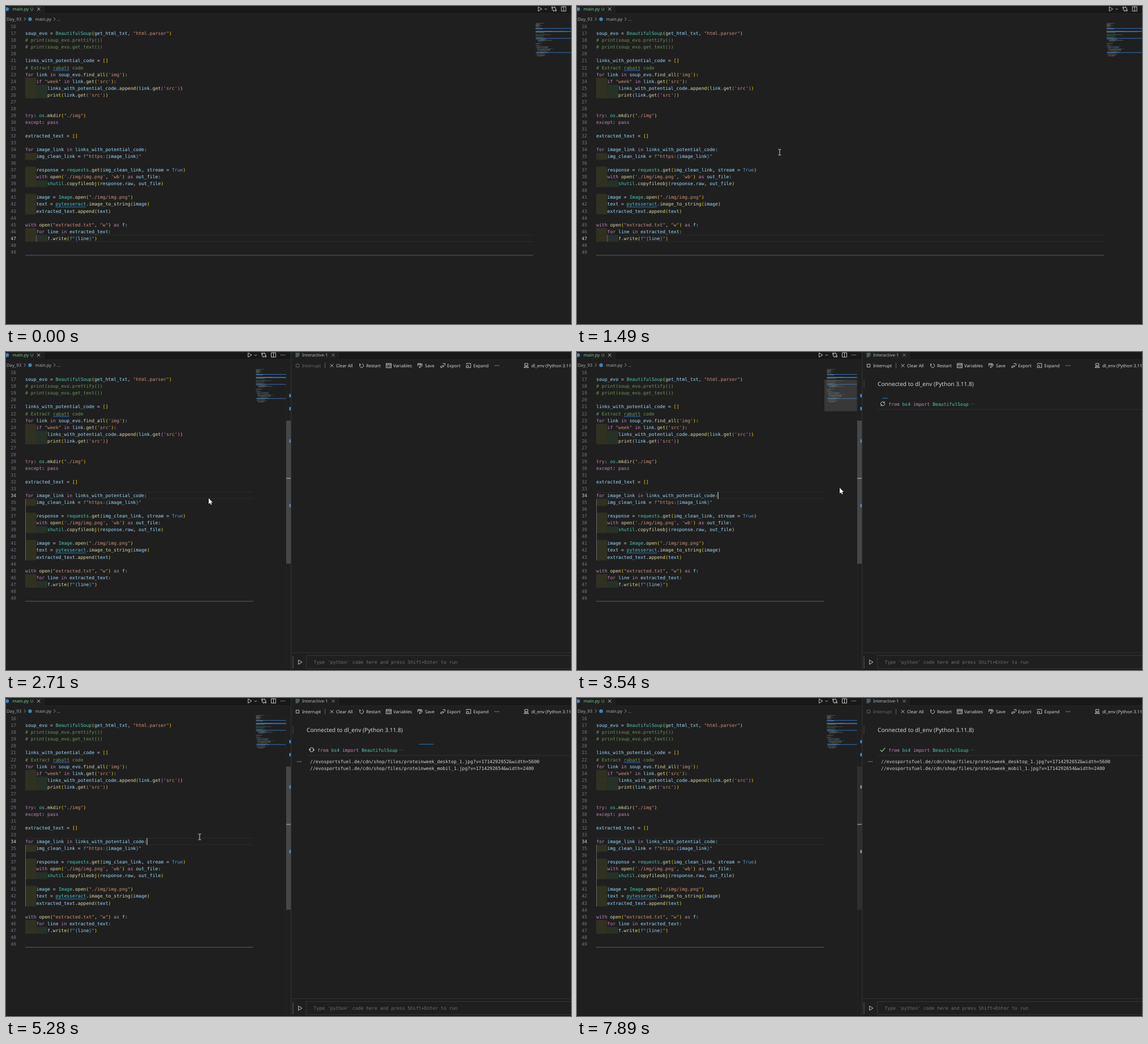
Recreate the animation shown at these times as an HTML page with a canvas. Size 998x561 px, loop 8000 ms.

```html
<!DOCTYPE html>
<html lang="en">
<head>
<meta charset="utf-8">
<title>Editor session</title>
<style>
html, body { margin: 0; width: 100%; height: 100%; overflow: hidden; background: #1f1f1f; }
canvas { display: block; width: 998px; height: 561px; }
</style>
</head>
<body>
<canvas id="stage" width="998" height="561"></canvas>
<script>
const ctx = document.getElementById('stage').getContext('2d');
const W = 998, H = 561, LOOP = 8000;
const CW = 4.886, LH = 12.047, LEFT = 34, FIRST = 16, TOP = 30.35;
const MONO = '8.116px "DejaVu Sans Mono", "Noto Sans Mono", monospace';
const ui = size => size + 'px "Noto Sans", "Open Sans", sans-serif';
const C = {
  bg: '#1f1f1f', bar: '#181818', edge: '#2b2b2b', text: '#d4d4d4', dim: '#6e7681',
  key: '#c586c0', name: '#9cdcfe', type: '#4ec9b0', fn: '#dcdcaa', str: '#ce9178',
  note: '#6a9955', lit: '#569cd6', op: '#d4d4d4', info: '#3794ff'
};
const BRACKETS = ['#ffd700', '#da70d6', '#179fff'];

const SOURCE = `
soup_evo = BeautifulSoup(get_html_txt, "html.parser")
# print(soup_evo.prettify())
# print(soup_evo.get_text())

links_with_potential_code = []
# Extract rabatt code
for link in soup_evo.find_all('img'):
    if "week" in link.get('src'):
        links_with_potential_code.append(link.get('src'))
        print(link.get('src'))


try: os.mkdir("./img")
except: pass

extracted_text = []

for image_link in links_with_potential_code:
    img_clean_link = f"https:{image_link}"

    response = requests.get(img_clean_link, stream = True)
    with open('./img/img.png', 'wb') as out_file:
        shutil.copyfileobj(response.raw, out_file)

    image = Image.open("./img/img.png")
    text = pytesseract.image_to_string(image)
    extracted_text.append(text)

with open("extracted.txt", "w") as f:
    for line in extracted_text:
        f.write(f"{line}")

`.split('\n');

const KEYS = new Set('for in if with as try except pass from import'.split(' '));
const TYPES = new Set('BeautifulSoup os requests shutil Image pytesseract bs4'.split(' '));

function tokenize(line) {
  const out = [];
  let depth = 0;
  const add = (col, text, color) => out.push({ col, text, color });
  for (const m of line.matchAll(/#.*|f"[^"]*"|"[^"]*"|'[^']*'|\w+|[^\w\s]/g)) {
    const s = m[0], at = m.index;
    if (s[0] === '#') add(at, s, C.note);
    else if (s.startsWith('f"')) {
      add(at, 'f', C.lit);
      for (const p of s.slice(1).matchAll(/[{}]|[^{}]+/g)) {
        const inner = s[p.index] === '{';
        add(at + 1 + p.index, p[0], /[{}]/.test(p[0]) ? C.lit : inner ? C.name : C.str);
      }
    }
    else if (/["']/.test(s[0])) add(at, s, C.str);
    else if (/[(\[]/.test(s)) add(at, s, BRACKETS[depth++ % 3]);
    else if (/[)\]]/.test(s)) add(at, s, BRACKETS[--depth % 3]);
    else if (KEYS.has(s)) add(at, s, C.key);
    else if (TYPES.has(s)) add(at, s, C.type);
    else if (s === 'True') add(at, s, C.lit);
    else if (/\w/.test(s)) add(at, s, line[at + s.length] === '(' ? C.fn : C.name);
    else add(at, s, C.op);
  }
  return out;
}

const LINES = SOURCE.map((text, i) => ({
  no: FIRST + i,
  depth: text.search(/\S/) / 4,
  tokens: tokenize(text)
}));
const CELL = tokenize('from bs4 import BeautifulSoup');
const HEAD = [29, 15, 13, 22, 9, 15, 0, 24, 24, 0, 0, 56, 104, 30, 0];
const NOTED = [8, 12, 22, 42];

const lineTop = no => TOP + (no - FIRST) * LH;

function box(x, y, w, h, color) {
  ctx.fillStyle = color;
  ctx.fillRect(x, y, w, h);
}

function label(text, x, y, color, font, align = 'left') {
  ctx.font = font;
  ctx.fillStyle = color;
  ctx.textAlign = align;
  ctx.fillText(text, x, y);
}

function tokensAt(tokens, x, y) {
  for (const t of tokens) label(t.text, x + t.col * CW, y, t.color, MONO);
}

function icon(path, x, y, color = C.text, width = 0.9, turn = 0) {
  ctx.save();
  ctx.translate(x, y);
  ctx.rotate(turn);
  ctx.strokeStyle = color;
  ctx.lineWidth = width;
  ctx.stroke(new Path2D(path));
  ctx.restore();
}

function disc(x, y, r, color) {
  ctx.fillStyle = color;
  ctx.beginPath();
  ctx.arc(x, y, r, 0, 7);
  ctx.fill();
}

function dots(x, y, color = C.text) {
  for (const d of [-3, 0, 3]) disc(x + d, y, 0.7, color);
}

const ICON = {
  play: 'M-2.8-3.8L3.4 0L-2.8 3.8Z',
  down: 'M-2-1L0 1L2-1',
  next: 'M-1.3-3L1.5 0L-1.3 3',
  cross: 'M-2.7-2.7L2.7 2.7M2.7-2.7L-2.7 2.7',
  compare: 'M-3-1V2Q-3 3 0 3M-1 1.5L.5 3L-1 4.5M3 1V-2Q3-3 0-3M1-4.5L-.5-3L1-1.5M-4-3.5h2v2h-2zM2 1.5h2v2h-2z',
  split: 'M-4-3.8H4V3.8H-4ZM0-3.8V3.8',
  stop: 'M-2.6-2.6H2.6V2.6H-2.6Z',
  redo: 'M-2.5-2.2A3.4 3.4 0 1 0 1-3.3M-3.2-3.8V-1.6H-1',
  table: 'M-4.5-3.8H4.5V3.8H-4.5ZM-4.5-1.8H4.5M-2.5 0H-.5M-2.5 2H-.5M1 0H3M1 2H3',
  save: 'M-3.6 1V-3.6H3L4-2.6V-1M-1.8-3.6V-1.5H1.5V-3.6M-1 3.5L0 1L3-1.5L4.4 0L1.5 2.7Z',
  send: 'M-3.5 3.5V1H2M0-1L2 1L0 3M0-3.6H4V0M-3.5 3.5H-1',
  expand: 'M-3.8-2V-3.8H3.8V3.5H1M-3.8 0H0V3.6H-3.8Z',
  kernel: 'M-2.8-3.8H2.8V0H-2.8ZM-4 3.5L-2.6 1.4H2.6L4 3.5Z',
  sync: 'M-3.3 1A3.4 3.4 0 0 1 2.6-2.2M3.3-1A3.4 3.4 0 0 1-2.6 2.2M3-4V-1.8H.8M-3 4V1.8H-.8',
  check: 'M-4.2 .4L-1.4 3L4.2-3.4',
  page: 'M-3.5-3H3.5M-3.5-1H3.5M-3.5 1H3.5M-3.5 3H1',
  beam: 'M-2.5-5H-.7L0-4.5L.7-5H2.5M0-4.5V4.5M-2.5 5H-.7L0 4.5L.7 5H2.5'
};

function squiggle(col, len, no) {
  const y = lineTop(no) + 11;
  ctx.strokeStyle = C.info;
  ctx.lineWidth = 0.8;
  ctx.beginPath();
  for (let x = 0; x <= len * CW; x += 0.5) {
    ctx.lineTo(LEFT + col * CW + x, y + 0.7 * Math.sin(x * 2));
  }
  ctx.stroke();
}

function minimap(x, right, slider) {
  const row = no => 30.3 + (no - 1) * 1.25;
  ctx.globalAlpha = 0.4;
  HEAD.forEach((n, i) => box(x, row(i + 1), n * 0.52, 0.8, i % 3 ? C.op : C.type));
  for (const l of LINES) {
    for (const t of l.tokens) box(x + t.col * 0.52, row(l.no), t.text.length * 0.52, 0.8, t.color);
  }
  ctx.globalAlpha = 0.7;
  for (const no of NOTED) box(x, row(no), right - x, no === 12 ? 1.5 : 1, C.info);
  ctx.globalAlpha = 1;
  if (slider > 0) box(x - 4.5, 49, right - x + 4.5, 55.5, `rgba(121,121,121,${0.27 * slider})`);
}

function editor(t, split) {
  const right = split ? 437 : 931;
  const current = t < 1520 ? 47 : 34;

  for (const l of LINES) {
    const y = lineTop(l.no);
    if (l.depth > 0) box(LEFT, y, 4 * CW, LH, 'rgba(255,255,64,.08)');
    if (l.depth > 1) box(LEFT + 4 * CW, y, 4 * CW, LH, 'rgba(127,255,127,.08)');
  }
  const y = lineTop(current);
  box(LEFT, y, right - LEFT, 0.9, '#2d2d2d');
  box(LEFT, y + LH - 0.9, right - LEFT, 0.9, '#2d2d2d');
  if (current === 47) box(LEFT + 4 * CW, y, 0.7, LH, '#808080');
  else box(LEFT, lineTop(35), 0.7, 9 * LH, '#808080');

  for (const l of LINES) {
    const base = lineTop(l.no) + 8.9;
    label(l.no, 18, base, l.no === current ? C.text : C.dim, MONO, 'right');
    tokensAt(l.tokens, LEFT, base);
  }
  squiggle(10, 6, 22);
  squiggle(11, 11, 42);
  box(LEFT, 439.3, right - LEFT, 0.9, '#5e666c');

  const blink = t < 2180 ? t >= 1520 && t < 2030 : Math.floor((t - 2180) / 510) % 2 === 0;
  if (blink) box(248.6, y, 1.1, LH, '#d8d8d8');
}

function editorBars(split) {
  const width = split ? 503 : W, dx = split ? 0 : 512.5;
  box(0, 0, width, 13.5, C.bar);
  box(0, 13.2, width, 0.7, C.edge);
  box(0, 0, 67, 14, C.bg);
  box(67, 0, 0.7, 13.5, C.edge);
  disc(2, 5.5, 3.2, '#3f86b8');
  label('main.py', 11.5, 8.4, '#73c991', ui(7.7));
  label('U', 43, 8.4, '#73c991', ui(7.4));
  icon(ICON.cross, 57.7, 5.4);

  const gray = '#a9a9a9';
  label('Day_93', 1, 26, gray, ui(7.7));
  icon(ICON.next, 33, 23, gray, 0.8);
  disc(42.5, 23.2, 3.2, '#3f86b8');
  label('main.py', 51.5, 26, gray, ui(7.7));
  icon(ICON.next, 85.5, 23, gray, 0.8);
  label('...', 90, 26, gray, ui(7.7));

  icon(ICON.play, 430.5 + dx, 5.3);
  icon(ICON.down, 441 + dx, 5.5);
  icon(ICON.compare, 455.5 + dx, 5.3);
  icon(ICON.split, 472.5 + dx, 5.2);
  dots(489 + dx, 5.3);
}

function scrollbar(t) {
  const fade = 1 - Math.min(1, Math.max(0, (t - 7400) / 800));
  box(495, 30, 0.6, 530, C.edge);
  for (const y of [77, 100, 157, 271]) {
    box(500.3, y - 2.8, 3.4, 5.6, t > 7800 && y > 121 ? '#8c96a3' : '#3a8ee6');
  }
  box(495, 121, 8.5, 252.5, `rgba(121,121,121,${0.45 * fade})`);
  box(495, 222.3, 8.5, 1.2, '#a8a8a8');
}

function toolbar(busy) {
  const f = ui(7.7), y = 27, m = 24;
  const stop = busy ? C.text : '#6b6b6b';
  icon(ICON.stop, 515, m, stop);
  label('Interrupt', 523, y, stop, f);
  box(563, 19, 0.8, 10, '#777');
  const items = [
    ['cross', 575.5, 583, 'Clear All'], ['redo', 628, 636, 'Restart'],
    ['table', 676, 684, 'Variables'], ['save', 731, 740, 'Save'],
    ['send', 771.5, 779, 'Export'], ['expand', 817, 825.5, 'Expand'],
    ['kernel', 919, 928, 'dl_env (Python 3.11.8)']
  ];
  for (const [name, ix, tx, text] of items) {
    icon(ICON[name], ix, m);
    label(text, tx, y, C.text, f);
  }
  dots(867, m);
}

function progress(t) {
  const p = (t - 3467) / 4000, bit = 9.3;
  const w = bit * (1 + 2 * (1 - Math.abs(2 * p - 1)));
  const mid = 531 + bit / 2 + 49 * bit * p;
  box(mid - w / 2, 81, w, 1, '#1a7cc8');
}

function panel(t) {
  const busy = t >= 3200 && t < 6000;
  box(503.5, 0, W - 503.5, H, C.bg);
  box(587, 0, W - 587, 13.5, C.bar);
  box(587, 13.2, W - 587, 0.7, C.edge);
  box(587, 0, 0.7, 13.5, C.edge);
  box(503.2, 0, 0.9, H, '#3a3a3a');
  icon(ICON.page, 515, 5.3, '#7ea3b8');
  label('Interactive-1', 523, 8.4, '#b4b4b4', ui(7.7));
  icon(ICON.cross, 578, 5.4, '#a0a0a0', 0.8);

  box(504, 530, W - 504, 0.9, '#333');
  box(506.5, 537, 0.9, 21, '#6a6a6a');
  icon(ICON.play, 519.5, 547.2);

  if (t >= 2315) toolbar(busy);
  if (t >= 2390) {
    ctx.strokeStyle = '#383838';
    ctx.lineWidth = 0.9;
    ctx.strokeRect(530.5, 535.5, 480, 23);
    label("Type 'python' code here and press Shift+Enter to run", 543.5, 550.2, '#6f6f6f', MONO);
  }
  if (t >= 3050) {
    box(506.5, 49, 0.9, 15, '#4a4a4a');
    label('Connected to dl_env (Python 3.11.8)', 531, 60.2, C.text, ui(10.11));
  }
  if (t >= 3200) {
    tokensAt(CELL, 550, 94.5);
    for (const d of [0, 2.4, 4.8]) disc(696 + d, 91.7, 0.55, '#8a8a8a');
    box(531, 100.8, W - 531, 0.8, '#333');
    if (busy) icon(ICON.sync, 540, 91.3, C.text, 0.9, t / 1500 * 2 * Math.PI - 14.8);
    else icon(ICON.check, 540, 91.3, '#89d185', 1.2);
  }
  if (t >= 3467 && t < 6000) progress(t);
  if (t >= 4300) {
    dots(518, 112.3);
    const path = '//evosportsfuel.de/cdn/shop/files/proteinweek_';
    label(path + 'desktop_1.jpg?v=1714292652&width=5600', 537, 115.3, C.text, MONO);
    label(path + 'mobil_1.jpg?v=1714292654&width=2400', 537, 127.4, C.text, MONO);
  }
}

// Pointer stops: time, x, y.
const PATH = [
  [70, -8, 300], [200, 240, 130], [340, 780, 240], [480, 600, 505], [620, 250, 470], [750, 114, 383],
  [960, 114, 383], [1400, 358, 258], [2980, 358, 258], [3450, 464, 239.5], [3820, 464, 239.5],
  [4450, 342, 245], [7110, 342, 245], [7450, -10, 439]
];

function pointerAt(t) {
  const i = PATH.findIndex(p => p[0] > t);
  if (i < 1) return null;
  const [a, b] = [PATH[i - 1], PATH[i]];
  const k = (t - a[0]) / (b[0] - a[0]);
  const e = b[0] <= 620 ? k : k * k * (3 - 2 * k);
  return [a[1] + (b[1] - a[1]) * e, a[2] + (b[2] - a[2]) * e];
}

function pointer(t) {
  const p = pointerAt(t);
  if (!p) return;
  const [x, y] = p;
  const arrow = x < 30 || x > 437 && t > 2180 || t >= 2180 && t < 3820;
  if (!arrow) {
    icon(ICON.beam, x, y, '#e8e8e8');
    return;
  }
  ctx.save();
  ctx.translate(x, y);
  const shape = new Path2D('M0 0V10.2L2.3 8L3.9 11.6L5.6 10.8L4 7.4H7.2Z');
  ctx.lineWidth = 1;
  ctx.strokeStyle = '#000';
  ctx.stroke(shape);
  ctx.fillStyle = '#fff';
  ctx.fill(shape);
  ctx.restore();
}

function draw(t) {
  const split = t >= 2180;
  ctx.textBaseline = 'alphabetic';
  ctx.textRendering = 'geometricPrecision';
  box(0, 0, W, H, C.bg);
  editor(t, split);
  editorBars(split);
  const hover = Math.min(1, (t - 3250) / 100, (4100 - t) / 100);
  minimap(split ? 441.5 : 935.5, split ? 494.5 : W, split ? hover : 0);
  if (split) {
    scrollbar(t);
    panel(t);
  }
  box(0, 560, W, 1, '#141414');
  pointer(t);
}

function tick(now) {
  draw(now % LOOP);
  requestAnimationFrame(tick);
}
draw(0);
requestAnimationFrame(tick);
</script>
</body>
</html>
```
